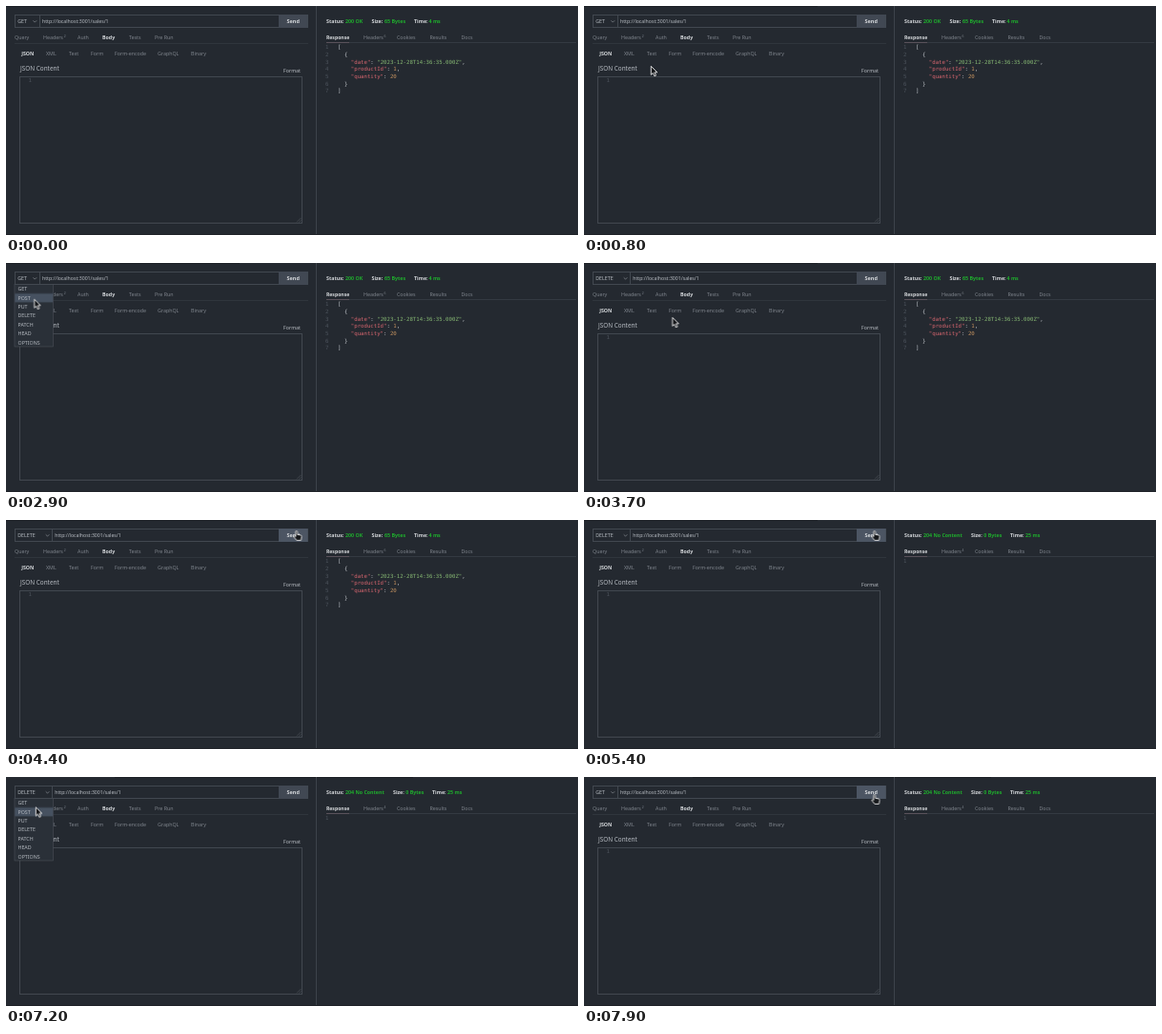
An HTML page for the animation above (8 s loop, 600 by 241 pixels).

```html
<!DOCTYPE html>
<html lang="en">
<head>
<meta charset="utf-8">
<title>API request</title>
<style>
html, body { margin: 0; width: 100%; height: 100%; overflow: hidden; background: #242930; }
svg { display: block; width: 600px; height: 241px; }
text { font: 5.3px "Noto Sans", "Open Sans", sans-serif; fill: #7f858d; white-space: pre; }
.hi { fill: #d6d9dc; font-weight: 600; }
.lit { fill: #b8bdc3; }
.url { font-size: 5.2px; }
.ok { fill: #1fae2d; font-weight: 600; }
.sup { font-size: 3.4px; }
.code text { font: 5.7px "DejaVu Sans Mono", monospace; fill: #c4c8cd; }
.code .num { fill: #4d545d; }
.key { fill: #d8666f; }
.str { fill: #86b873; }
.val { fill: #c69260; }
.line { fill: none; stroke: #424850; }
.chevron { fill: none; stroke: #8d9299; stroke-width: .7; }

/* State switches */
.sw { animation: 8s step-end infinite; }
.get { animation-name: get; }
.delete { animation-name: delete; }
.before { animation-name: before; }
.after { animation-name: after; }
.menu { animation-name: menu; }
.early { animation-name: early; }
.late { animation-name: late; }
.arrow { animation-name: arrow; }
.hand { animation-name: hand; }
.pick { animation-name: pick; }
@keyframes get { 0%, 95% { opacity: 1 } 43.75% { opacity: 0 } 100% { opacity: 1 } }
@keyframes delete { 0%, 95% { opacity: 0 } 43.75% { opacity: 1 } 100% { opacity: 0 } }
@keyframes before { 0% { opacity: 1 } 56.25%, 100% { opacity: 0 } }
@keyframes after { 0% { opacity: 0 } 56.25%, 100% { opacity: 1 } }
@keyframes early { 0% { opacity: 1 } 68.75%, 100% { opacity: 0 } }
@keyframes late { 0% { opacity: 0 } 68.75%, 100% { opacity: 1 } }
@keyframes menu { 0%, 43.75%, 95%, 100% { opacity: 0 } 28.75%, 85% { opacity: 1 } }
@keyframes arrow { 0%, 52.5%, 98.75%, 100% { opacity: 0 } 1.25%, 68.75% { opacity: 1 } }
@keyframes hand { 0%, 68.75%, 100% { opacity: 0 } 52.5%, 98.75% { opacity: 1 } }
@keyframes pick {
  0%, 91.25%, 100% { transform: none }
  36.25% { transform: translateY(9.4px) }
  37.5% { transform: translateY(18.8px) }
  38.75%, 85% { transform: translateY(28.2px) }
  88.75% { transform: translateY(9.4px) }
}

/* Pointer path, sampled every 100 ms */
.pointer { animation: move 8s infinite; }
@keyframes move {
  0%, 1.25% { transform: translate(230px, 232px); animation-timing-function: steps(5) }
  7.5% { transform: translate(82px, 80px); animation-timing-function: steps(2) }
  10% { transform: translate(70px, 63px); animation-timing-function: steps(4) }
  15% { transform: translate(52px, 38px); animation-timing-function: steps(4) }
  20% { transform: translate(29px, 16px); animation-timing-function: step-end }
  28.75% { transform: translate(29px, 16px); animation-timing-function: steps(4) }
  33.75% { transform: translate(29px, 27px); animation-timing-function: steps(5) }
  40% { transform: translate(30px, 54px); animation-timing-function: step-end }
  43.75% { transform: translate(30px, 54px); animation-timing-function: steps(2) }
  46.25% { transform: translate(92.5px, 57px); animation-timing-function: steps(6) }
  53.75% { transform: translate(301.5px, 11px); animation-timing-function: step-end }
  67.5% { transform: translate(301.5px, 11px); animation-timing-function: steps(8) }
  77.5% { transform: translate(29.5px, 15px); animation-timing-function: step-end }
  85% { transform: translate(29.5px, 15px); animation-timing-function: steps(3) }
  88.75% { transform: translate(31px, 36px); animation-timing-function: steps(2) }
  91.25% { transform: translate(31px, 27px); animation-timing-function: step-end }
  95% { transform: translate(31px, 27px); animation-timing-function: steps(3) }
  98.75%, 100% { transform: translate(301.5px, 18px) }
}
</style>
</head>
<body>
<svg viewBox="0 0 600 241">
  <rect width="600" height="241" fill="#242930"/>
  <rect class="sw early" width="245" height="1" fill="#1a1e23"/>
  <rect class="sw late" x="114" width="313" height="1" fill="#1a1e23"/>
  <path d="M325.5 0V240" stroke="#3d434b"/>
  <rect y="240" width="600" height="1" fill="#1e2127"/>

  <!-- Request bar -->
  <rect class="line" x="9.5" y="9.5" width="307" height="13"/>
  <rect x="286" y="9" width="30.5" height="14" fill="#414853"/>
  <rect class="sw hand" x="286" y="9" width="30.5" height="14" fill="#4c5563"/>
  <text class="hi" x="294.5" y="18.2" style="font-size:5.5px">Send</text>
  <g class="sw get">
    <path class="line" d="M35.5 10V22"/>
    <path class="chevron" d="M28.5 15.3l1.8 1.8l1.8-1.8"/>
    <text class="lit" x="12.2" y="18.2">GET</text>
    <text class="lit url" x="38" y="17.6">http://localhost:3001/sales/1</text>
  </g>
  <g class="sw delete">
    <path class="line" d="M48.5 10V22"/>
    <path class="chevron" d="M41.7 15.3l1.8 1.8l1.8-1.8"/>
    <text class="lit" x="12.2" y="18.2">DELETE</text>
    <text class="lit url" x="51.2" y="17.6">http://localhost:3001/sales/1</text>
  </g>

  <!-- Request tabs -->
  <path d="M9 39.5H317" stroke="#30363d"/>
  <text y="35"><tspan x="9">Query</tspan><tspan x="39">Headers</tspan><tspan x="75">Auth</tspan><tspan class="hi" x="101">Body</tspan><tspan x="129">Tests</tspan><tspan x="156">Pre Run</tspan></text>
  <text class="sup" x="60.7" y="33">2</text>
  <text y="52.2"><tspan class="hi" x="16.2">JSON</tspan><tspan x="42">XML</tspan><tspan x="66">Text</tspan><tspan x="89">Form</tspan><tspan x="114">Form-encode</tspan><tspan x="159">GraphQL</tspan><tspan x="194">Binary</tspan></text>
  <text class="lit" x="15" y="68.2" style="font-size:6.4px">JSON Content</text>
  <text class="lit" x="291" y="70">Format</text>
  <rect class="line" x="14.5" y="74.5" width="296" height="154"/>
  <path d="M305 227.5l4.5-4.5M307.5 227.5l2-2" stroke="#555b63" stroke-width=".6"/>
  <g class="code"><text class="num" x="23.5" y="80.1">1</text></g>

  <!-- Response -->
  <path d="M336 38.5H598" stroke="#343a42"/>
  <path d="M336 38.5H360" stroke="#5a525b"/>
  <text y="35"><tspan class="hi" x="336" style="font-size:5.1px">Response</tspan><tspan x="375">Headers</tspan><tspan x="410">Cookies</tspan><tspan x="444.5">Results</tspan><tspan x="477.5">Docs</tspan></text>
  <text class="hi" x="336" y="18.2">Status:</text>
  <g class="code"><text class="num" x="335" y="45.3">1</text></g>
  <g class="sw before">
    <text class="sup" x="396.5" y="33">6</text>
    <text class="ok" y="18.2"><tspan x="356">200 OK</tspan><tspan class="hi" x="383.5">Size:</tspan><tspan x="397">65 Bytes</tspan><tspan class="hi" x="428">Time:</tspan><tspan x="443.5">4 ms</tspan></text>
    <g class="code">
      <text class="num"><tspan x="335" y="52.9">2</tspan><tspan x="335" y="60.5">3</tspan><tspan x="335" y="68.2">4</tspan><tspan x="335" y="75.9">5</tspan><tspan x="335" y="83.6">6</tspan><tspan x="335" y="91.3">7</tspan></text>
      <text x="348" y="45.3">[</text>
      <text x="354.9" y="52.9">{</text>
      <text x="361.8" y="60.5"><tspan class="key">"date"</tspan>: <tspan class="str">"2023-12-28T14:36:35.000Z"</tspan>,</text>
      <text x="361.8" y="68.2"><tspan class="key">"productId"</tspan>: <tspan class="val">1</tspan>,</text>
      <text x="361.8" y="75.9"><tspan class="key">"quantity"</tspan>: <tspan class="val">20</tspan></text>
      <text x="354.9" y="83.6">}</text>
      <text x="348" y="91.3">]</text>
    </g>
  </g>
  <g class="sw after">
    <text class="sup" x="396.5" y="33">4</text>
    <text class="ok" y="18.2"><tspan x="356">204 No Content</tspan><tspan class="hi" x="406">Size:</tspan><tspan x="419.3">0 Bytes</tspan><tspan class="hi" x="447">Time:</tspan><tspan x="463">25 ms</tspan></text>
  </g>

  <!-- Method list -->
  <g class="sw menu">
    <rect x="9" y="22.5" width="40.5" height="65.5" fill="#2a3038" stroke="#4b5159" stroke-width=".6"/>
    <rect class="sw pick" x="9.3" y="22.7" width="39.9" height="9.2" fill="#465160"/>
    <text class="lit"><tspan x="12.5" y="29.2">GET</tspan><tspan x="12.5" y="38.6">POST</tspan><tspan x="12.5" y="48">PUT</tspan><tspan x="12.5" y="57.4">DELETE</tspan><tspan x="12.5" y="66.8">PATCH</tspan><tspan x="12.5" y="76.2">HEAD</tspan><tspan x="12.5" y="85.6">OPTIONS</tspan></text>
  </g>

  <g class="pointer" fill="#16181b" stroke="#ececec" stroke-width=".9" stroke-linejoin="round">
    <path class="sw arrow" d="M.3 .3V9.4L2.4 7.5L3.9 10.8L5.5 10.1L4 6.9H6.9Z"/>
    <path class="sw hand" d="M2.3 6.4V1.5Q2.3 .5 3.2 .5T4.1 1.5V4.3L7.4 4.9Q8.7 5.2 8.6 6.5L7.9 10.4H3.4L.7 7Q.2 6 1.1 5.7Z"/>
  </g>
</svg>
</body>
</html>
```
